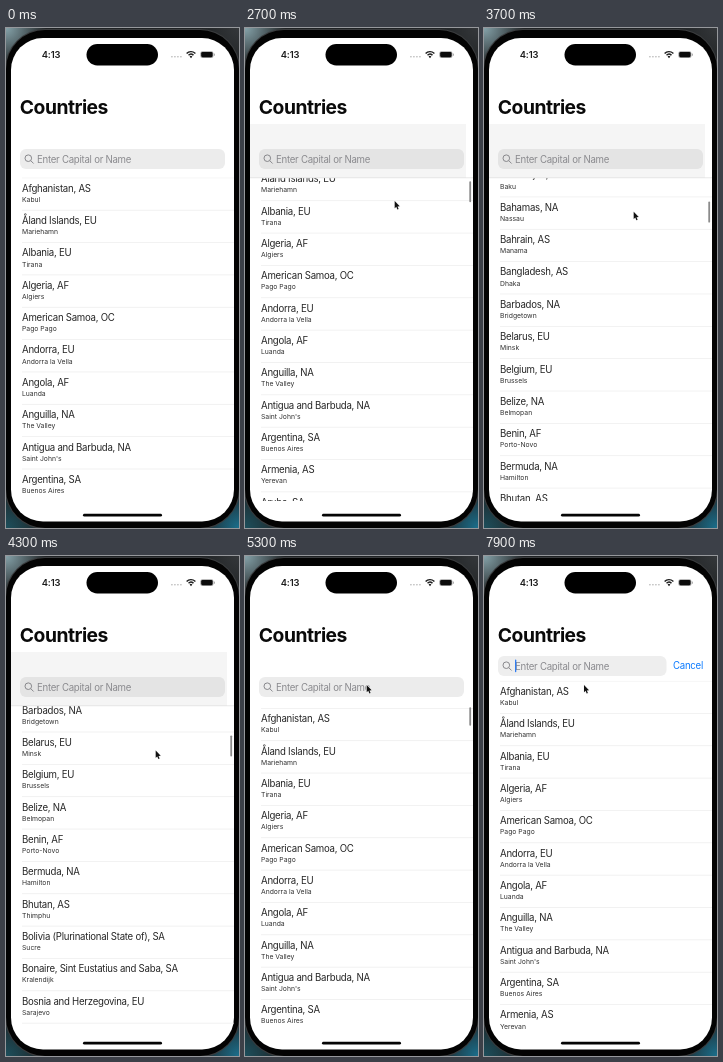
These frames come from a looping animation (233x500 px, 8 s). An HTML page with a canvas:

```html
<!DOCTYPE html>
<html lang="en">
<head>
<meta charset="utf-8">
<title>Countries</title>
<style>
html, body { margin: 0; width: 100%; height: 100%; overflow: hidden; background: #000; }
canvas { display: block; width: 233px; height: 500px; }
</style>
</head>
<body>
<canvas id="stage"></canvas>
<script>
const W = 233, H = 500, LOOP = 8000, ROW = 32.35, LIST_TOP = 150, LIST_END = 473;
const FARTHEST = 588.5, BOUNCE = 2.5;
const canvas = document.getElementById('stage');
const ctx = canvas.getContext('2d');
const dpr = window.devicePixelRatio || 1;
canvas.width = W * dpr;
canvas.height = H * dpr;

const rows = `Afghanistan, AS|Kabul
Åland Islands, EU|Mariehamn
Albania, EU|Tirana
Algeria, AF|Algiers
American Samoa, OC|Pago Pago
Andorra, EU|Andorra la Vella
Angola, AF|Luanda
Anguilla, NA|The Valley
Antigua and Barbuda, NA|Saint John's
Argentina, SA|Buenos Aires
Armenia, AS|Yerevan
Aruba, SA|Oranjestad
Australia, OC|Canberra
Austria, EU|Vienna
Azerbaijan, AS|Baku
Bahamas, NA|Nassau
Bahrain, AS|Manama
Bangladesh, AS|Dhaka
Barbados, NA|Bridgetown
Belarus, EU|Minsk
Belgium, EU|Brussels
Belize, NA|Belmopan
Benin, AF|Porto-Novo
Bermuda, NA|Hamilton
Bhutan, AS|Thimphu
Bolivia (Plurinational State of), SA|Sucre
Bonaire, Sint Eustatius and Saba, SA|Kralendijk
Bosnia and Herzegovina, EU|Sarajevo
Botswana, AF|Gaborone
Brazil, SA|Brasília`.split('\n').map(line => line.split('|'));

const clamp = v => Math.max(0, Math.min(1, v));

function ease(t, from, to) {
  const u = clamp((t - from) / (to - from));
  return u * u * (3 - 2 * u);
}

const scrollAt = t => FARTHEST * ease(t, 2400, 4240)
  - (FARTHEST + BOUNCE) * ease(t, 4300, 5200)
  + BOUNCE * ease(t, 5300, 5800);

const focusAt = t => ease(t, 6100, 6500) ** 2;

const caretAt = t => t < 6100 ? 0 : clamp(0.5 + 1.6 * Math.cos((t - 7060) / 1000 * Math.PI * 2));

const barAt = t => ease(t, 2200, 2500) - ease(t, 7100, 7500);

function cursorAt(t) {
  if (t < 200 || (t >= 800 && t < 1700)) return null;
  if (t < 800) return [199, 489 - 98 * (t >= 270) - 73 * (t >= 700)];
  const down = ease(t, 1800, 2400), back = ease(t, 4600, 5200);
  return [
    160 - 10.3 * down - 28 * back - 21.7 * ease(t, 5400, 5900),
    124.8 + 48.2 * down + 21.6 * ease(t, 3100, 4300) - 65.6 * back
  ];
}

function box(x, y, w, h, r, fill) {
  ctx.beginPath();
  ctx.roundRect(x, y, w, h, r);
  ctx.fillStyle = fill;
  ctx.fill();
}

function text(str, x, y, size, fill, weight = 400, spacing = 0) {
  ctx.font = `${weight} ${size}px Inter, sans-serif`;
  ctx.letterSpacing = spacing + 'px';
  ctx.fillStyle = fill;
  ctx.fillText(str, x, y);
}

const body = (str, x, y, fill) => text(str, x, y, 9.64, fill, 400, -0.26);

function faded(alpha, draw) {
  if (alpha <= 0) return;
  ctx.save();
  ctx.globalAlpha = alpha;
  draw();
  ctx.restore();
}

function glow(x, y, color) {
  const shine = ctx.createRadialGradient(x, y, 0, x, y, 40);
  shine.addColorStop(0, color);
  shine.addColorStop(1, '#1f2224');
  ctx.fillStyle = shine;
  ctx.fillRect(x ? W / 2 : 0, y ? H / 2 : 0, W / 2, H / 2);
}

function drawBezel() {
  glow(0, 0, '#86a3aa');
  glow(W, 0, '#34373a');
  glow(0, H, '#1d4f5c');
  glow(W, H, '#1b6f8c');
  box(-1, 1, 235, 500, 40, '#3a3c3e');
  box(0, 2, 233, 498, 39, '#030303');
  box(5, 10, 223, 483.5, 32, '#fff');
}

function drawStatus() {
  text('4:13', 35.7, 30, 9.4, '#1c1c1c', 600, -0.15);
  box(80.5, 16, 71.5, 21.5, 10.75, '#000');
  for (let i = 0; i < 4; i++) box(165 + i * 3, 28, 1.8, 1.6, 0.8, '#bdbdbd');
  ctx.strokeStyle = '#1c1c1c';
  ctx.lineWidth = 1.4;
  for (const r of [3.4, 6]) {
    ctx.beginPath();
    ctx.arc(185, 29.6, r, -Math.PI * 0.76, -Math.PI * 0.24);
    ctx.stroke();
  }
  ctx.beginPath();
  ctx.moveTo(185, 30.2);
  ctx.arc(185, 29.6, 1.7, -Math.PI * 0.8, -Math.PI * 0.2);
  ctx.fillStyle = '#1c1c1c';
  ctx.fill();
  box(194.3, 23.2, 13.2, 6.8, 2.2, '#a5a5a5');
  box(195.2, 24, 11.4, 5.2, 1.4, '#0b0b0b');
  box(208, 25.4, 0.9, 2.4, 0.4, '#a5a5a5');
}

function drawList(scroll, top) {
  ctx.save();
  ctx.beginPath();
  ctx.rect(5, top - 0.5, 223, LIST_END - top + 0.5);
  ctx.clip();
  rows.forEach(([name, capital], i) => {
    const y = top + i * ROW - scroll;
    if (y < top - ROW || y > LIST_END) return;
    ctx.fillStyle = '#ececec';
    ctx.fillRect(16, y - 0.5, 212, 0.7);
    body(name, 16, y + 13.7, '#262626');
    text(capital, 16, y + 23.8, 6.8, '#303030');
  });
  ctx.restore();
}

function drawHeader(scroll, focus, top, caret) {
  const tint = clamp(scroll / 20);
  faded(tint, () => {
    ctx.fillStyle = '#f5f5f5';
    ctx.fillRect(5, 96, 216, top - 96);
    ctx.fillStyle = '#dedede';
    ctx.fillRect(5, top - 0.5, 223, 0.7);
  });
  text('Countries', 13.8, 86, 19.3, '#0a0a0a', 700, -0.5);

  const y = 121 - 21 * focus;
  const shade = Math.round(236 - 8 * tint + 2 * focus);
  box(14, y, 205 - 36.5 * focus, 20, 6, `rgb(${shade}, ${shade}, ${shade})`);

  ctx.strokeStyle = '#88888c';
  ctx.lineWidth = 1;
  ctx.beginPath();
  ctx.arc(22.3, y + 9.2, 3.3, 0, Math.PI * 2);
  ctx.moveTo(24.7, y + 11.6);
  ctx.lineTo(27.6, y + 14.5);
  ctx.stroke();
  body('Enter Capital or Name', 31, y + 13.5, '#8a8a8e');
  faded(caret, () => box(31, y + 3.6, 1.3, 12.6, 0.6, '#2f7cf0'));

  ctx.save();
  ctx.beginPath();
  ctx.rect(5, 90, 223, 60);
  ctx.clip();
  faded(focus, () => body('Cancel', 225 - 36 * focus, y + 13.3, '#0a7aff'));
  ctx.restore();
}

function drawScrollbar(scroll, top, alpha) {
  const length = 21 + Math.min(0, scroll);
  faded(alpha, () => box(224.3, top + 1.2 + 0.048 * Math.max(0, scroll), 1.8, length, 0.9, '#8b8b8b'));
}

function drawCursor(pos) {
  if (!pos) return;
  ctx.save();
  ctx.translate(pos[0], pos[1]);
  ctx.beginPath();
  ctx.moveTo(0, 0);
  ctx.lineTo(0, 7.2);
  ctx.lineTo(1.6, 5.8);
  ctx.lineTo(2.7, 8.4);
  ctx.lineTo(3.9, 7.9);
  ctx.lineTo(2.8, 5.4);
  ctx.lineTo(5, 5.2);
  ctx.closePath();
  ctx.lineJoin = 'round';
  ctx.strokeStyle = '#f4f4f4';
  ctx.lineWidth = 1.2;
  ctx.stroke();
  ctx.fillStyle = '#111';
  ctx.fill();
  ctx.restore();
}

function render(time) {
  // The picture moves in steps of a tenth of a second.
  const t = Math.floor(time / 100) * 100;
  const scroll = scrollAt(t);
  const focus = focusAt(t);
  const top = LIST_TOP - 24.8 * focus;
  ctx.setTransform(dpr, 0, 0, dpr, 0, 0);
  drawBezel();
  drawStatus();
  drawList(scroll, top);
  drawHeader(scroll, focus, top, caretAt(t));
  drawScrollbar(scroll, top, barAt(t));
  box(77, 485.8, 79, 2.8, 1.4, '#050505');
  drawCursor(cursorAt(time < 800 ? time : t));
}

const start = performance.now();
function tick() {
  render((performance.now() - start) % LOOP);
  requestAnimationFrame(tick);
}
tick();
</script>
</body>
</html>
```
